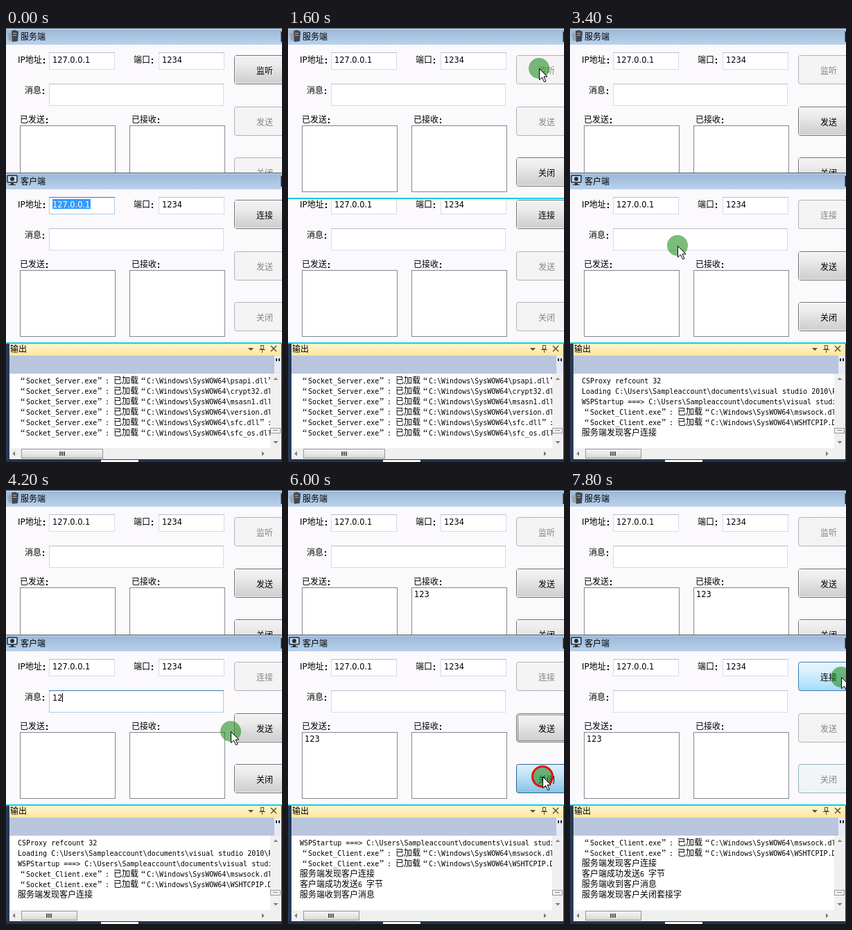
An HTML page with a canvas that plays this animation: 398 px wide and 624 px high, repeating every 8000 ms.

```html
<!DOCTYPE html>
<html lang="zh">
<head>
<meta charset="utf-8">
<style>
html, body { margin: 0; width: 100%; height: 100%; overflow: hidden; background: #fbf9fc; }
canvas { display: block; }
</style>
</head>
<body>
<canvas id="stage" width="398" height="624"></canvas>
<script>
const ctx = document.getElementById('stage').getContext('2d');
const LOOP = 8000, STEP = 200;
const CJK = '12px "Noto Sans CJK SC", "Noto Sans CJK", sans-serif';
const MONO = '10px "DejaVu Sans Mono", monospace';
const FIELD = '11.4px "DejaVu Sans", sans-serif';
const LABEL = '12px "DejaVu Sans", "Noto Sans CJK SC", "Noto Sans CJK", sans-serif';
const QUOTE = '14px "Liberation Serif", serif';

// Cursor stops: time, x, y
const path = [
  [0, -40, 215], [200, 8, 215], [400, 190, 170], [600, 359, 100], [800, 362, 62],
  [1600, 362, 58], [1800, 362, 90], [2400, 363, 268], [2800, 363, 268], [3000, 286, 276],
  [3200, 155, 312], [3800, 155, 314], [4000, 270, 330], [4200, 324, 347], [4600, 362, 343],
  [4800, 364, 345], [5000, 365, 358], [5200, 366, 395], [5400, 367, 412], [6200, 367, 412],
  [6600, 374, 375], [7200, 374, 272], [7400, 374, 258], [7600, 380, 262], [7800, 391, 269]
];
const clicks = [1000, 2600, 3600, 4800, 6000];

const loaded = (app, dll) => `“Socket_${app}.exe”: 已加载“C:\\Windows\\SysWOW64\\${dll}”:`;
const project = 'C:\\Users\\Sampleaccount\\documents\\visual studio 2010\\Projects';
const startup = count => ['CSProxy refcount ' + count, 'Loading ' + project, 'WSPStartup ===> ' + project];
const log = [
  ...['psapi', 'crypt32', 'msasn1', 'version', 'sfc', 'sfc_os'].map(n => loaded('Server', n + '.dll')),
  ...startup(31), loaded('Server', 'WSHTCPIP.DLL'), '服务端创建套接字成功', '服务端监听成功',
  ...startup(32), loaded('Client', 'mswsock.dll'), loaded('Client', 'WSHTCPIP.DLL'), '服务端发现客户连接',
  '客户端成功发送6 字节', '服务端收到客户消息', '服务端发现客户关闭套接字'
];
const logLength = t => t < 1800 ? 6 : t < 3000 ? 12 : t < 5400 ? 18 : t < 6200 ? 20 : 21;

function cursorAt(t) {
  const i = path.findIndex(p => p[0] > t);
  if (i < 1) return path[i < 0 ? path.length - 1 : 0].slice(1);
  const [t0, x0, y0] = path[i - 1], [t1, x1, y1] = path[i];
  const k = (t - t0) / (t1 - t0);
  return [x0 + (x1 - x0) * k, y0 + (y1 - y0) * k];
}

function rect(x, y, w, h, color) {
  ctx.fillStyle = color;
  ctx.fillRect(x, y, w, h);
}

function box(x, y, w, h, fill, border) {
  rect(x, y, w, h, border);
  rect(x + 1, y + 1, w - 2, h - 2, fill);
}

function shade(y, h, ...colors) {
  const g = ctx.createLinearGradient(0, y, 0, y + h);
  colors.forEach((c, i) => g.addColorStop(i / (colors.length - 1), c));
  return g;
}

function poly(points, color) {
  ctx.fillStyle = color;
  ctx.beginPath();
  points.forEach(([x, y]) => ctx.lineTo(x, y));
  ctx.fill();
}

function disc(x, y, r, color) {
  ctx.fillStyle = color;
  ctx.beginPath();
  ctx.arc(x, y, r, 0, 7);
  ctx.fill();
}

function write(s, x, y, font, color = '#000') {
  ctx.font = font;
  ctx.fillStyle = color;
  ctx.fillText(s, x, y);
}

// Half-width characters take 6px; full-width ones, including curly quotes, take 12px
function mixed(s, x, y) {
  for (const run of s.match(/[\x20-\x7e]+|[“”]|[^\x20-\x7e“”]+/g)) {
    const half = run.charCodeAt(0) < 127;
    if (run === '“') write(run, x + 4, y + 1, QUOTE);
    else if (run === '”') write(run, x + 1, y + 1, QUOTE);
    else write(run, x, y, half ? MONO : CJK);
    x += run.length * (half ? 6 : 12);
  }
}

function label(s, x, y) {
  write(s, x, y, LABEL);
  rect(x + Math.round(ctx.measureText(s).width) + 2, y - 6, 2, 2, '#000');
  rect(x + Math.round(ctx.measureText(s).width) + 2, y - 1, 2, 2, '#000');
}

function clipped(x, y, w, h, draw) {
  ctx.save();
  ctx.beginPath();
  ctx.rect(x, y, w, h);
  ctx.clip();
  draw();
  ctx.restore();
}

const buttonStyles = {
  normal: [['#f3f3f3', '#ebebeb', '#dadada', '#cdcdcd'], '#707070', '#000'],
  hot: [['#eaf6fd', '#d9f0fc', '#bee6fd', '#a7d9f5'], '#3c7fb1', '#000'],
  pressed: [['#e0f1fa', '#c4e5f6', '#a6d4ee', '#86c0e0'], '#2c628b', '#000'],
  disabled: [['#f5f4f5', '#f3f3f4'], '#b0b3b7', '#858585'],
  faded: [['#f3f6f7', '#edf3f4'], '#8fb5bd', '#858585']
};

function button(caption, y, style, focused) {
  const [colors, border, ink] = buttonStyles[style];
  ctx.beginPath();
  ctx.roundRect(329.5, y + .5, 88, 41, 3);
  ctx.fillStyle = shade(y, 42, ...colors);
  ctx.fill();
  ctx.strokeStyle = border;
  ctx.lineWidth = 1;
  ctx.stroke();
  if (style === 'normal') {
    ctx.strokeStyle = 'rgba(255,255,255,.75)';
    ctx.strokeRect(330.5, y + 1.5, 86, 39);
  }
  if (focused) {
    ctx.setLineDash([1, 1]);
    ctx.strokeStyle = '#222';
    ctx.strokeRect(331.5, y + 2.5, 84, 37);
    ctx.setLineDash([]);
  }
  write(caption, 361, y + 27, CJK, ink);
}

function field(x, y, w, h, text, focused) {
  box(x, y, w, h, '#fff', focused ? '#a9cbe8' : '#d3dce8');
  rect(x, y, w, 1, focused ? '#3d7bad' : '#b4c0ce');
  write(text, x + 5, y + 15, FIELD);
}

function serverIcon() {
  poly([[2, 9], [6, 6], [9, 8], [9, 19], [4, 18]], '#9aa5b1');
  poly([[8, 4], [13, 3], [18, 5], [17, 19], [9, 20]], '#43474d');
  rect(10, 7, 5, 1, '#aeb3b9');
  rect(10, 10, 5, 1, '#aeb3b9');
}

function clientIcon() {
  ctx.lineWidth = 1.5;
  ctx.strokeStyle = '#222b36';
  ctx.fillStyle = '#c4d6ea';
  ctx.beginPath();
  ctx.roundRect(2, 4, 14, 10, 1);
  ctx.fill();
  ctx.stroke();
  disc(9, 9, 3, '#222b36');
  rect(7, 15, 4, 2, '#222b36');
  rect(4, 17, 10, 1, '#222b36');
}

function appWindow(top, w) {
  ctx.save();
  ctx.translate(0, top);
  rect(0, 0, 398, 246, '#fbf9fc');
  rect(0, 0, 398, 24, shade(0, 24, '#9ab6d6', '#b9d2ec'));
  rect(0, 0, 398, 1, '#3f4c5c');
  rect(0, 1, 398, 1, '#d8e5f3');
  rect(396.5, 5, 2, 15, '#1b2028');
  w.icon();
  write(w.title, 21, 16.5, CJK);
  label('IP地址', 17, 50);
  label('端口', 184, 50);
  label('消息', 27, 94);
  label('已发送', 20, 136);
  label('已接收', 181, 136);
  field(62, 35, 95, 25, '127.0.0.1', w.selected);
  if (w.selected) {
    rect(67, 38, 55, 14, '#3399ff');
    write('127.0.0.1', 67, 50, FIELD, '#fff');
  }
  field(220, 35, 95, 25, '1234');
  field(62, 80, 252, 32, w.message, w.typing);
  if (w.typing) rect(Math.round(67 + ctx.measureText(w.message).width), 84, 1, 13, '#000');
  box(20, 140, 138, 96, '#fff', '#828790');
  box(178, 140, 138, 96, '#fff', '#828790');
  write(w.sent, 24, 154, FIELD);
  write(w.received, 182, 154, FIELD);
  w.buttons.forEach(([caption, style, focused], i) => button(caption, [39, 113, 186][i], style, focused));
  ctx.restore();
}

function arrow(x, y, dx, dy, size, color) {
  poly([[x + dx * size, y + dy * size], [x + dy * size, y + dx * size], [x - dy * size, y - dx * size]], color);
}

function outputPanel(t) {
  rect(0, 454, 398, 170, '#293a56');
  rect(0, 452, 398, 2, '#12cfe0');
  rect(5, 454, 392, 17, shade(454, 17, '#fff5d2', '#ffe69c'));
  write('输出', 6, 465.5, CJK);
  arrow(353, 460, 0, 1, 4, '#5c5030');
  ctx.strokeStyle = '#5c5030';
  ctx.lineWidth = 1;
  ctx.strokeRect(367.5, 456.5, 4, 5);
  rect(365, 462, 9, 1, '#5c5030');
  rect(369, 462, 1, 5, '#5c5030');
  ctx.lineWidth = 1.5;
  ctx.beginPath();
  ctx.moveTo(382, 457); ctx.lineTo(390, 465);
  ctx.moveTo(390, 457); ctx.lineTo(382, 465);
  ctx.stroke();

  rect(5, 471, 382, 26, '#bac5de');
  rect(387, 471, 10, 26, '#e6eaf3');
  rect(389, 475, 2, 4, '#222');
  rect(393, 475, 2, 4, '#222');

  rect(5, 497, 376, 107, '#fff');
  const end = logLength(t);
  clipped(5, 497, 376, 107, () =>
    log.slice(end - 6, end).forEach((line, i) => mixed(line, 17, 511 + i * 15)));

  rect(381, 497, 16, 123, '#f0f0f1');
  arrow(389, 506, 0, -1, 3.5, '#8a8a8a');
  arrow(389, 594, 0, 1, 3.5, '#777');
  box(381, 575, 15, 8, '#f3f3f3', '#979797');
  rect(385, 578, 7, 1, '#888');

  rect(5, 604, 376, 16, '#f0f0f1');
  arrow(13, 612, -1, 0, 3.5, '#777');
  arrow(369, 612, 1, 0, 3.5, '#777');
  const width = t < 1800 ? 118 : 81;
  box(22, 605, width, 14, shade(605, 14, '#f6f6f6', '#e8e8e8', '#d2d2d2'), '#979797');
  for (let i = 0; i < 3; i++) rect(22 + (width >> 1) - 4 + i * 3, 609, 2, 6, '#555');
  rect(0, 620, 398, 4, '#22344f');
  rect(137, 621, 54, 3, '#f6f7f9');
}

function pointer(x, y, clicked) {
  disc(x, y, 15, 'rgba(20,135,20,.56)');
  if (clicked) {
    ctx.strokeStyle = '#f00808';
    ctx.lineWidth = 3;
    ctx.beginPath();
    ctx.arc(x, y, 14.5, 0, 7);
    ctx.stroke();
  }
  ctx.save();
  ctx.translate(Math.round(x) + .5, Math.round(y) + .5);
  poly([[0, 0], [0, 16], [4, 12.5], [7, 19], [9.5, 18], [6.5, 11.5], [11.5, 11.5]], '#fff');
  ctx.closePath();
  ctx.strokeStyle = '#000';
  ctx.lineWidth = 1;
  ctx.stroke();
  ctx.restore();
}

function draw(t) {
  const clicked = clicks.includes(t);
  const [hx, hy] = cursorAt(t - STEP); // hover highlight trails the cursor by a step
  const style = (enabled, y) => !enabled ? 'disabled' :
    hx < 329 || hy < y || hy > y + 42 ? 'normal' : clicked ? 'pressed' : 'hot';

  const raised = t >= 1000 && t < 2600;
  const connected = t >= 2800 && t < 6200;
  const delivered = t >= 5000 ? '123' : '';
  const typing = t >= 3800 && t < 5000;

  appWindow(208, {
    title: '客户端', icon: clientIcon, selected: t < 1000, typing,
    message: typing ? '123'.slice(0, (t - 3800) / STEP) : '',
    sent: delivered, received: '',
    buttons: [
      ['连接', style(!connected, 247)],
      ['发送', style(connected, 321), t >= 5000 && connected],
      ['关闭', t >= 7400 ? 'faded' : style(connected, 394)]
    ]
  });
  clipped(0, 0, 398, raised ? 246 : 208, () => {
    appWindow(0, {
      title: '服务端', icon: serverIcon, message: '', sent: '', received: delivered,
      buttons: [
        ['监听', style(t < 1400, 39)],
        ['发送', t >= 3000 ? 'normal' : 'disabled'],
        ['关闭', t >= 1400 ? 'normal' : 'disabled']
      ]
    });
    if (raised) rect(0, 244, 398, 2, '#12cfe0');
  });
  outputPanel(t);
  if (t > 0) pointer(...cursorAt(t), clicked);
}

function frame(now) {
  draw(Math.floor(now % LOOP / STEP) * STEP);
  requestAnimationFrame(frame);
}
requestAnimationFrame(frame);
</script>
</body>
</html>
```
